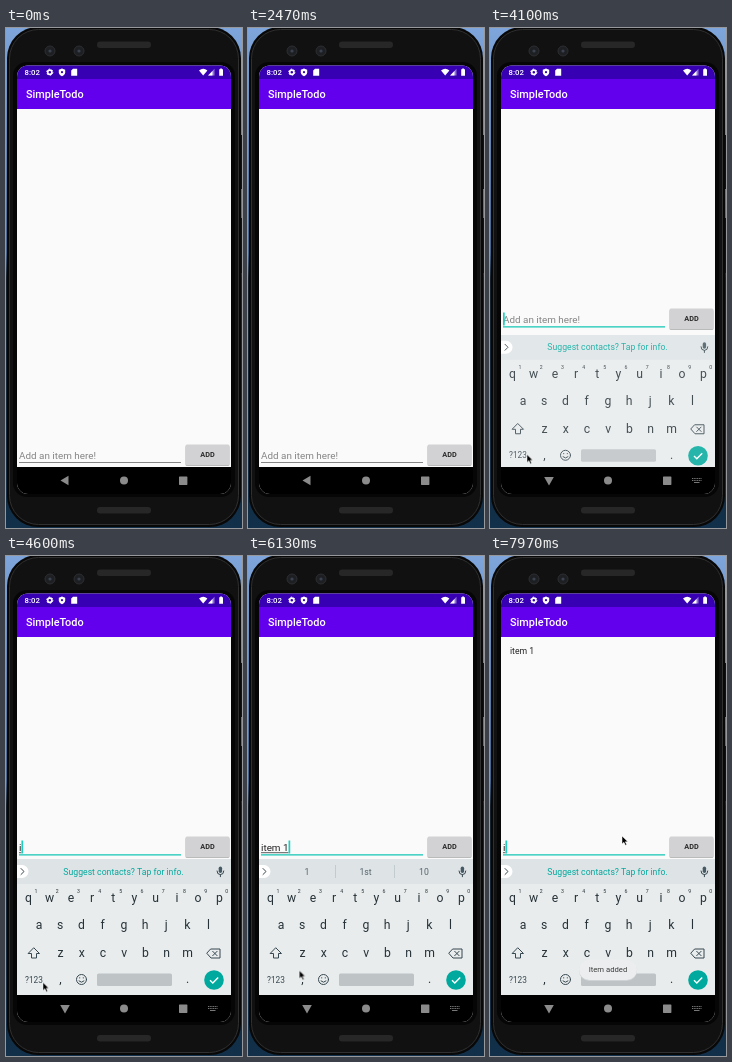
Write an HTML page that moves like this. It is 236 px wide and 500 px high and loops after 8000 ms.

```html
<!DOCTYPE html>
<html lang="en">
<head>
<meta charset="utf-8">
<title>Todo app demo</title>
<style>
  html, body { margin: 0; width: 100%; height: 100%; overflow: hidden; background: #000; }
  svg { display: block; width: 100%; height: 100%; font-family: Roboto, sans-serif; }
  text { white-space: pre; }
  .mid { text-anchor: middle; }
  .line { fill: none; stroke: #37474f; stroke-width: 1; stroke-linejoin: round; stroke-linecap: round; }
  .teal { fill: #00a99d; }
  #entry, #keyboard, #press, #toast, #mouse, #navOpen, #navClosed, #idleLine, #focusLine {
    animation: 8s linear infinite;
  }
  #entry { animation-name: lift; animation-timing-function: step-end; }
  #keyboard { animation-name: slide; animation-timing-function: ease-out; }
  #press { animation-name: press; animation-timing-function: step-end; }
  #toast { animation-name: toast; }
  #mouse { animation-name: mouse; animation-timing-function: ease-in-out; }
  #navOpen, #focusLine { animation-name: appear; animation-timing-function: step-end; }
  #navClosed, #idleLine { animation-name: vanish; animation-timing-function: step-end; }
  @keyframes lift { 0% { transform: none; } 48.4%, 100% { transform: translateY(-136px); } }
  @keyframes slide {
    0%, 46.8% { transform: translateY(136px); opacity: .6; }
    51.2% { transform: translateY(4px); opacity: .85; }
    53%, 100% { transform: none; opacity: 1; }
  }
  @keyframes press { 0% { fill: #d2d2d4; } 84% { fill: #bebfbf; } 87.5%, 100% { fill: #d2d2d4; } }
  @keyframes toast { 0%, 85% { opacity: 0; } 87.5%, 100% { opacity: 1; } }
  @keyframes appear { 0% { opacity: 0; } 46.8%, 100% { opacity: 1; } }
  @keyframes vanish { 0% { opacity: 1; } 46.8%, 100% { opacity: 0; } }
  @keyframes mouse {
    0%, 36% { transform: translate(110px, 360px); opacity: 0; }
    36.1% { transform: translate(110px, 360px); opacity: 1; }
    43%, 75% { transform: translate(37px, 426.5px); opacity: 1; }
    83%, 90% { transform: translate(204.5px, 287px); opacity: 1; }
    97%, 100% { transform: translate(132px, 280px); opacity: 1; }
  }
</style>
</head>
<body>
<svg viewBox="0 0 236 500" preserveAspectRatio="none">
  <defs>
    <linearGradient id="sky" x2="0" y2="1">
      <stop offset="0" stop-color="#7fa6dc"/>
      <stop offset=".45" stop-color="#43628c"/>
      <stop offset=".5" stop-color="#18212b"/>
      <stop offset="1" stop-color="#12304a"/>
    </linearGradient>
    <clipPath id="screen"><rect x="11" y="37.5" width="214" height="428.5" rx="11"/></clipPath>
    <clipPath id="content"><rect x="11" y="81" width="214" height="358"/></clipPath>
  </defs>

  <rect width="236" height="500" fill="url(#sky)"/>
  <path d="M233 107h3v54h-3zM233 190h3v55h-3z" fill="#111"/>
  <rect x="1" y="-1" width="234" height="500" rx="31" fill="#080808"/>
  <rect x="3.5" y="1.5" width="229" height="495" rx="29" fill="#111" stroke="#303030"/>
  <rect x="7" y="34" width="222" height="435" rx="14" fill="#060606"/>
  <g fill="#272727">
    <rect x="91" y="13.5" width="54" height="6.5" rx="3.2"/>
    <rect x="91" y="479" width="54" height="6.5" rx="3.2"/>
  </g>
  <g fill="#1d1f22" stroke="#2c2e31">
    <circle cx="44" cy="23" r="5"/><circle cx="73" cy="23" r="5"/>
  </g>
  <g fill="#3a4250"><circle cx="44" cy="23" r="1.6"/><circle cx="73" cy="23" r="1.6"/></g>

  <g clip-path="url(#screen)">
    <rect x="11" y="37" width="214" height="429" fill="#fafafa"/>
    <rect x="11" y="37" width="214" height="14" fill="#3700b3"/>
    <rect x="11" y="51" width="214" height="30" fill="#6200ee"/>
    <g fill="#fff">
      <text x="18.5" y="47" font-size="7.8" font-weight="500">8:02</text>
      <circle cx="43.8" cy="44.2" r="2.1" fill="none" stroke="#fff" stroke-width="1.6"/>
      <circle cx="43.8" cy="44.2" r="3.1" fill="none" stroke="#fff" stroke-dasharray="1.6 1.65"/>
      <path d="M56 40.5l3.2 1.2v2.6q0 2.6-3.2 3.9q-3.2-1.3-3.2-3.9v-2.6z"/>
      <circle cx="56" cy="44.2" r="1.1" fill="#3700b3"/>
      <path d="M67 40.7h4.2v7h-6v-5.2z"/>
      <path d="M193 42.4q4.2-3.2 8.4 0l-4.2 5.2z"/>
      <path d="M208.5 40.8v6.8h-6.4z" opacity=".45"/><path d="M206.5 43v4.6h-4.4z"/>
      <path d="M213.2 41.3h1v-.8h1.7v.8h1.1v6.5h-3.8z"/>
      <text x="20" y="70" font-size="10.9" font-weight="500">SimpleTodo</text>
    </g>

    <text id="added" x="20" y="97.5" font-size="8.7" fill="#222">item 1</text>

    <g id="entry">
      <text id="hint" x="13" y="431" font-size="9.9" fill="#858585">Add an item here!</text>
      <text id="typed" x="13" y="431" font-size="9.9" fill="#222"></text>
      <path id="composing" stroke="#333" stroke-width=".8"/>
      <path id="idleLine" d="M13 434.5h162" stroke="#858585"/>
      <path id="focusLine" d="M13 434.8h162" stroke="#12c6b5" stroke-width="1.3"/>
      <rect id="caret" y="420.5" width="1.7" height="13" fill="#1bd0c0"/>
      <rect x="179.5" y="417.5" width="44" height="20.5" rx="1.5" fill="#b9baba"/>
      <rect id="press" x="179.5" y="416.5" width="44" height="20.5" rx="1.5" fill="#d2d2d4"/>
      <text class="mid" x="201.5" y="429.3" font-size="7.3" font-weight="700" fill="#2b2b2b">ADD</text>
    </g>

    <g clip-path="url(#content)">
      <g id="keyboard">
        <rect x="11" y="303" width="214" height="137" fill="#e8eced"/>
        <rect x="11" y="303" width="214" height="25" fill="#dee3e6"/>
        <path d="M11 309h5a6.5 6.5 0 0 1 0 13h-5z" fill="#fff"/>
        <path class="line" d="M15 312.5l3 3-3 3"/>
        <text id="offer" class="mid teal" x="117.5" y="318.7" font-size="8.7">Suggest contacts? Tap for info.</text>
        <g id="ideas" class="mid" font-size="8.7" fill="#56656d">
          <path d="M87.5 309v13M146.5 309v13" stroke="#c4cbcf"/>
          <text x="59" y="318.7"></text><text x="117.5" y="318.7"></text><text x="176" y="318.7"></text>
        </g>
        <rect x="212.7" y="310.5" width="3.4" height="6.4" rx="1.7" fill="#455a64"/>
        <path class="line" d="M211 315q0 3.6 3.4 3.6t3.4-3.6M214.4 318.7v2"/>
        <g id="keys" class="mid" fill="#263238" font-size="12.2"></g>
        <path class="line" d="M28 392l5.5 5.5h-3v4.5h-5v-4.5h-3z"/>
        <path class="line" d="M205 393h9v9h-9l-4-4.5zM206.7 395.3l4.4 4.4m0-4.4l-4.4 4.4"/>
        <text class="mid" x="28" y="426.7" font-size="8.3" fill="#37474f">?123</text>
        <circle class="line" cx="75.5" cy="423.5" r="5"/>
        <path class="line" d="M73 425q2.5 2.6 5 0M73.7 421.7v.3M77.3 421.7v.3"/>
        <rect x="91" y="417.5" width="75" height="12.5" rx="1.5" fill="#bec3c6"/>
        <circle class="teal" cx="208" cy="424" r="9.8"/>
        <path d="M204 424.2l2.8 2.8 5.4-5.6" fill="none" stroke="#fff" stroke-width="1.4"/>
      </g>
    </g>

    <g id="toast">
      <rect x="89" y="404" width="58" height="21" rx="10.5" fill="#cfd3d5"/>
      <rect x="89" y="403.5" width="58" height="20.5" rx="10.2" fill="#ebedee"/>
      <text class="mid" x="118" y="416" font-size="7.7" fill="#3c3c3c">Item added</text>
    </g>

    <rect x="11" y="439" width="214" height="27" fill="#000"/>
    <g fill="#8b8b8b">
      <path id="navClosed" d="M54.5 452.5l8-4.7v9.4z"/>
      <g id="navOpen">
        <path d="M59 457.5l-4.8-8.5h9.6z"/>
        <path d="M202 450.5h9.5M202 452.5h9.5" stroke="#777" stroke-dasharray="1.1 .6"/>
        <path d="M204 454.5h5.5" stroke="#777"/>
      </g>
      <circle cx="118" cy="452.5" r="4"/>
      <rect x="173" y="448.5" width="8.4" height="8.4" rx=".6"/>
    </g>
  </g>

  <path id="mouse" d="M0 0v8l1.9-1.7 1.5 3 1.3-.6-1.4-2.9h2.6z" fill="#000" stroke="#fff" stroke-width=".5"/>
</svg>
<script>
  const LOOP = 8000, FOCUS = 3870, SUBMIT = 6790, LAG = 110;
  const typing = [
    [0, ''], [FOCUS, ''], [4530, 'i'], [4700, 'it'], [4890, 'ite'], [5060, 'item'],
    [5400, 'item '], [5680, 'item 1'], [SUBMIT, ''], [7930, 'i']
  ];
  const guesses = {
    i: ['I', 'in', 'it'], it: ['it', 'its', 'item'], ite: ['item', 'items', 'itemized'],
    item: ['item', 'items', 'itemized'], 'item ': ['is', 'to', 'in'], 'item 1': ['1', '1st', '10']
  };
  const $ = id => document.getElementById(id);
  const toggle = (node, on) => node.setAttribute('visibility', on ? 'visible' : 'hidden');
  const stepAt = t => typing.filter(([start]) => start <= Math.max(t, 0)).pop();

  function addKey(label, x, y, size) {
    const key = document.createElementNS('http://www.w3.org/2000/svg', 'text');
    key.textContent = label;
    key.setAttribute('x', x);
    key.setAttribute('y', y);
    if (size) key.setAttribute('font-size', size);
    $('keys').append(key);
  }
  const rows = [['qwertyuiop', 22.5, 346], ['asdfghjkl', 33, 373], ['zxcvbnm', 54.5, 401]];
  rows.forEach(([letters, x, y]) => [...letters].forEach((c, i) => addKey(c, x + i * 21.2, y)));
  [...'1234567890'].forEach((d, i) => addKey(d, 30 + i * 21.2, 337, 5.2));
  addKey(',', 54.5, 427);
  addKey('.', 181.5, 427);

  function render(t) {
    const [since, text] = stepAt(t);
    const ideas = guesses[stepAt(t - LAG)[1]];
    $('typed').textContent = text;
    const width = text ? $('typed').getComputedTextLength() : 0;
    $('caret').setAttribute('x', 13 + width);
    $('composing').setAttribute('d', text && !text.endsWith(' ') ? `M13 432.7h${width}` : '');
    toggle($('caret'), t >= FOCUS && (t - since) % 1000 < 500);
    toggle($('hint'), !text);
    toggle($('added'), t >= SUBMIT);
    toggle($('offer'), !ideas);
    toggle($('ideas'), ideas);
    $('ideas').querySelectorAll('text').forEach((node, i) => {
      node.textContent = ideas ? ideas[i] : '';
    });
  }

  const begin = performance.now();
  (function frame() {
    render((performance.now() - begin) % LOOP);
    requestAnimationFrame(frame);
  })();
</script>
</body>
</html>
```
